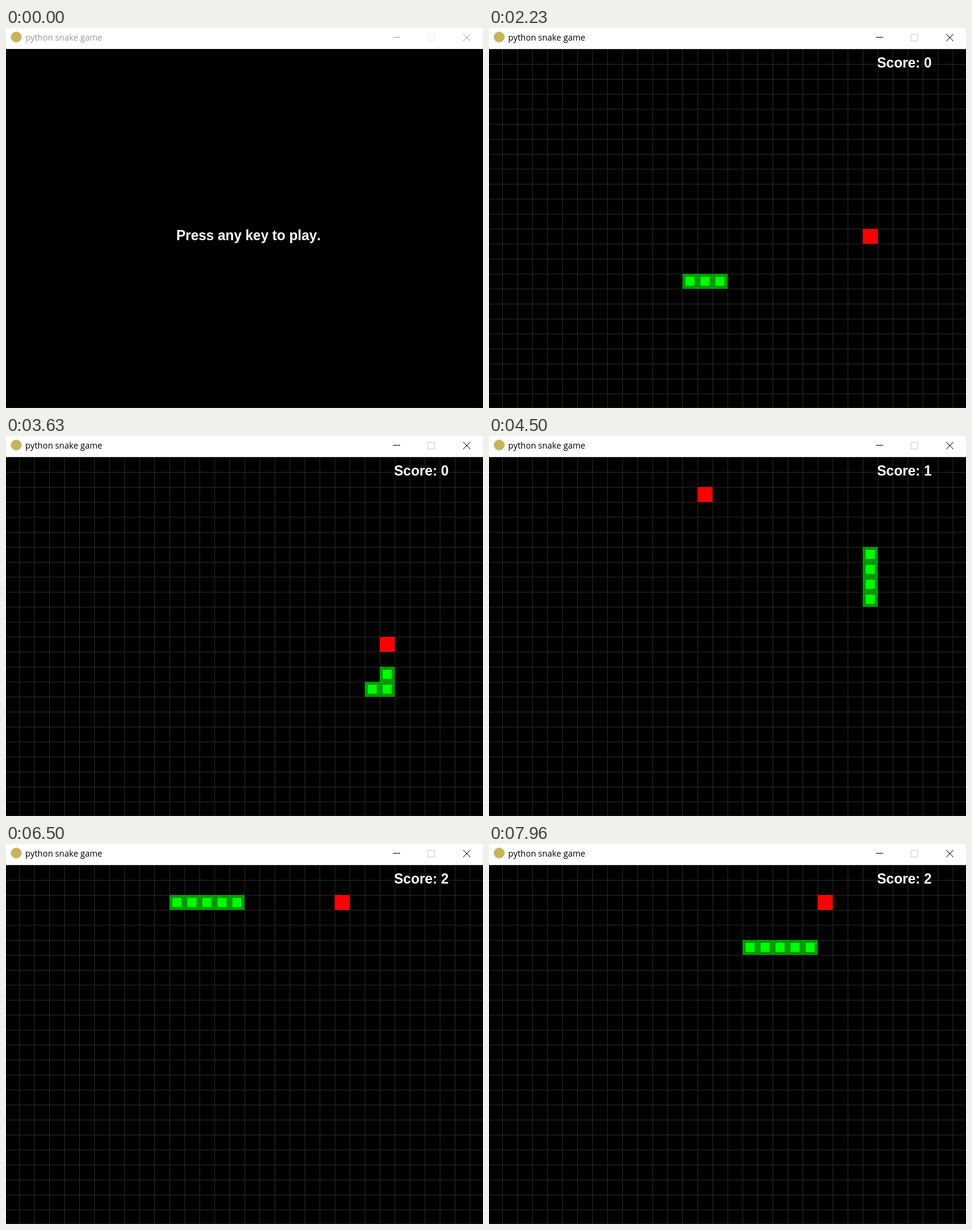
An HTML page with a canvas for the animation above (8000 ms loop, 794 px wide and 634 px high).

```html
<!DOCTYPE html>
<html lang="en">
<head>
<meta charset="utf-8">
<title>python snake game</title>
<style>
html, body { margin: 0; width: 100%; height: 100%; overflow: hidden; background: #000; }
canvas { display: block; }
</style>
</head>
<body>
<canvas id="stage" width="794" height="634"></canvas>
<script>
const ctx = document.getElementById('stage').getContext('2d');
const W = 794, H = 634, LOOP = 8000, CELL = 25, LEFT = -3, TOP = 35;
const FOCUS_AT = 430, GAME_AT = 2230;
const REFRESH = 77.4;            // ms between screen refreshes
const PACE = [123.5, 111, 99];   // ms per snake step, by score
const FIRST_STEP = 35.6;         // ms from the first refresh to the first step
const START_LENGTH = 3;
const CORNERS = [[13, 15], [25, 15], [25, 2], [10, 2], [10, 5], [21, 5]];
const APPLES = [[25, 12], [14, 2], [22, 2]];

// Every cell the head visits, in order
const path = [CORNERS[0]];
for (const [cx, cy] of CORNERS.slice(1)) {
  let [x, y] = path.at(-1);
  while (x !== cx || y !== cy) {
    x += Math.sign(cx - x);
    y += Math.sign(cy - y);
    path.push([x, y]);
  }
}

// Snake states: each step becomes visible at the latest screen refresh
const states = [];
let clock = FIRST_STEP, score = 0;
for (let head = START_LENGTH - 1; head < path.length; head++) {
  if (String(path[head]) === String(APPLES[score])) score++;
  states.push({
    start: GAME_AT + Math.floor(clock / REFRESH) * REFRESH,
    body: path.slice(head + 1 - START_LENGTH - score, head + 1),
    score
  });
  clock += PACE[score];
}

function rect(color, x, y, w, h) {
  ctx.fillStyle = color;
  ctx.fillRect(x, y, w, h);
}

function text(str, x, y, font, color) {
  ctx.font = font;
  ctx.fillStyle = color;
  ctx.fillText(str, x, y);
}

function boldText(str, x, y) {
  text(str, x, y, 'bold 23px "Liberation Sans", Arial, sans-serif', '#fff');
}

function square([col, row], color, inset = 0) {
  const size = CELL - 2 * inset;
  rect(color, LEFT + col * CELL + inset, TOP + row * CELL + inset, size, size);
}

function drawTitleBar(active) {
  const ink = active ? '#000' : '#999';
  rect('#fff', 0, 0, W, TOP);
  ctx.fillStyle = '#c6b45c';
  ctx.beginPath();
  ctx.arc(17, 15, 9, 0, 2 * Math.PI);
  ctx.fill();
  text('python snake game', 32, 21, '14px "Open Sans", "Noto Sans", sans-serif', ink);
  rect(ink, 644, 15, 12, 1);
  ctx.lineWidth = 1;
  ctx.strokeStyle = active ? '#ccc' : '#ebebeb';
  ctx.strokeRect(702.5, 10.5, 11, 11);
  ctx.strokeStyle = ink;
  ctx.beginPath();
  ctx.moveTo(761, 10);
  ctx.lineTo(773, 22);
  ctx.moveTo(773, 10);
  ctx.lineTo(761, 22);
  ctx.stroke();
}

function drawGame(t) {
  const { body, score } = states.findLast(s => s.start <= t);
  for (let x = LEFT; x < W; x += CELL) rect('#282828', x, TOP, 1, H - TOP);
  for (let y = TOP; y < H; y += CELL) rect('#282828', 0, y, W, 1);
  for (const cell of body) {
    square(cell, '#009b00');
    square(cell, '#0f0', 5);
  }
  square(APPLES[score], '#f00');
  boldText('Score: ' + score, 646, 66);
}

function draw() {
  const t = performance.now() % LOOP;
  rect('#000', 0, 0, W, H);
  if (t < GAME_AT) boldText('Press any key to play.', 283.5, 354);
  else drawGame(t);
  rect('#1c0a14', 0, H - 1, W, 1);
  drawTitleBar(t >= FOCUS_AT);
  requestAnimationFrame(draw);
}

ctx.fontKerning = 'none';
draw();
</script>
</body>
</html>
```
